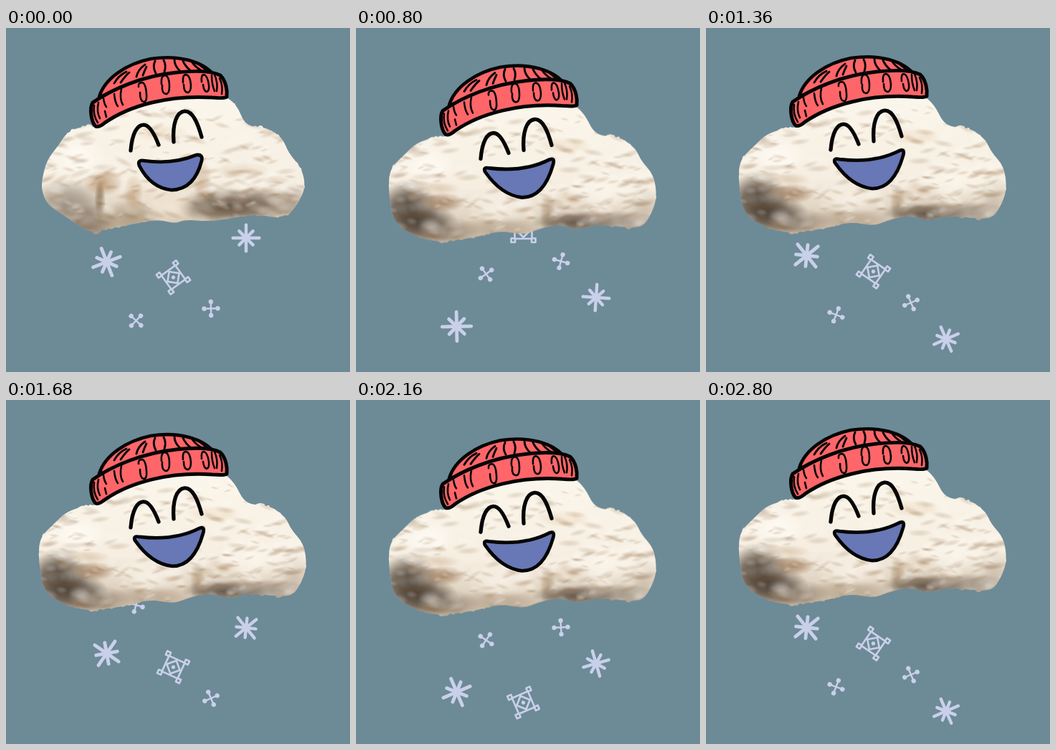
Recreate the animation shown at these times as an HTML page with a canvas. Size 480x480 px, loop 2.88 s.

```html
<!DOCTYPE html>
<html lang="en">
<head>
<meta charset="utf-8">
<title>Snow cloud</title>
<style>
html, body { margin: 0; width: 100%; height: 100%; overflow: hidden; background: #6d8a97; }
canvas { display: block; width: 480px; height: 480px; }
</style>
</head>
<body>
<canvas id="stage" width="480" height="480"></canvas>
<script>
const ctx = document.getElementById('stage').getContext('2d');
const STEP = 80, CYCLE = 18, HOLD = 3;
const SNOW = '#c9d0ea', BLACK = '#050505', RED = '#ff6669', BLUE = '#6877b5';
const mod = (a, n) => ((a % n) + n) % n;

// Cloud shapes: outline points, then soft shades as [x, y, rx, ry, rgb, alpha]
const clouds = [
  {
    seed: 7,
    outline: [50,212, 57,184, 74,163, 86,144, 112,136, 134,140, 152,116, 220,92, 300,92, 322,106, 334,137,
      362,138, 386,153, 394,174, 413,196, 418,222, 409,242, 396,260, 374,265, 350,259, 315,265, 284,270,
      250,267, 236,273, 214,267, 188,271, 160,277, 140,280, 120,286, 96,272, 76,258, 58,246, 50,228],
    shades: [
      [85,250,56,40,'134,122,108',.8], [118,272,40,26,'120,102,84',.75], [175,264,44,26,'150,126,98',.6],
      [135,216,28,18,'160,112,62',.6], [131,240,8,28,'100,70,42',.6], [305,248,66,26,'72,54,38',.85],
      [355,246,56,26,'112,94,78',.75], [274,214,14,30,'176,130,84',.5], [330,200,38,14,'196,160,122',.4],
      [402,246,24,30,'150,134,118',.5], [215,146,40,12,'220,188,146',.35], [178,230,14,26,'180,134,86',.5],
      [226,240,38,34,'240,226,206',.95], [345,212,44,20,'250,243,232',.8], [100,180,40,32,'255,251,244',.9]
    ]
  },
  {
    seed: 23,
    outline: [45,208, 48,184, 67,166, 84,149, 112,140, 136,139, 152,116, 220,92, 300,92, 319,108, 334,139,
      366,139, 390,156, 398,174, 416,194, 420,226, 411,250, 399,267, 370,266, 340,262, 310,269, 280,262,
      252,270, 234,277, 200,271, 170,280, 140,284, 112,287, 84,279, 62,267, 51,252, 48,232],
    shades: [
      [72,242,44,42,'52,40,30',.9], [98,262,46,28,'66,54,44',.85], [130,272,44,20,'130,116,102',.65],
      [120,232,32,14,'138,96,60',.65], [112,212,34,9,'190,158,120',.4], [200,268,62,16,'164,142,118',.55],
      [268,246,12,28,'150,116,80',.5], [305,260,60,18,'84,70,58',.85], [370,260,54,18,'126,112,98',.7],
      [300,226,26,12,'186,148,106',.4], [290,152,40,12,'226,196,158',.4], [402,242,24,34,'180,164,146',.45],
      [205,236,54,26,'250,243,232',.8], [345,213,50,28,'252,246,236',.8], [100,180,42,26,'255,251,244',.9]
    ]
  }
];

function smoothPath(p) {
  const path = new Path2D(), n = p.length;
  for (let i = 0; i <= n; i += 2) {
    const x = p[i % n], y = p[(i + 1) % n], nx = p[(i + 2) % n], ny = p[(i + 3) % n];
    if (i) path.quadraticCurveTo(x, y, (x + nx) / 2, (y + ny) / 2);
    else path.moveTo((x + nx) / 2, (y + ny) / 2);
  }
  path.closePath();
  return path;
}

// Small round tufts that break up the smooth edge
function addTufts(path, p, rand) {
  const n = p.length;
  for (let i = 0; i < n; i += 2) {
    for (let k = 0; k < 3; k++) {
      const u = rand(), r = 2 + rand() * 4;
      const x = p[i] + (p[(i + 2) % n] - p[i]) * u, y = p[i + 1] + (p[(i + 3) % n] - p[i + 1]) * u;
      const inset = (r + 1) / Math.hypot(x - 235, y - 195);
      path.moveTo(x, y);
      path.arc(x + (235 - x) * inset, y + (195 - y) * inset, r, 0, 2 * Math.PI);
    }
  }
}

function softBlob(c, x, y, rx, ry, rgb, alpha, turn = 0) {
  const g = c.createRadialGradient(0, 0, 0, 0, 0, 1);
  g.addColorStop(0, `rgba(${rgb},${alpha})`);
  g.addColorStop(.5, `rgba(${rgb},${alpha * .65})`);
  g.addColorStop(1, `rgba(${rgb},0)`);
  c.save();
  c.translate(x, y);
  c.rotate(turn);
  c.scale(rx, ry);
  c.fillStyle = g;
  c.fillRect(-1, -1, 2, 2);
  c.restore();
}

function renderCloud({ outline, shades, seed }) {
  const canvas = document.createElement('canvas');
  canvas.width = canvas.height = 480;
  const c = canvas.getContext('2d');
  const rand = () => (seed = seed * 16807 % 2147483647) / 2147483647;
  const path = smoothPath(outline);
  addTufts(path, outline, rand);
  c.clip(path);
  const base = c.createLinearGradient(0, 100, 0, 285);
  base.addColorStop(0, '#fbf6eb');
  base.addColorStop(.6, '#f6eee1');
  base.addColorStop(1, '#cfbfa9');
  c.fillStyle = base;
  c.fillRect(0, 0, 480, 480);
  for (const s of shades) softBlob(c, ...s);
  // Lit tufts over thin brown folds
  for (let i = 0; i < 260; i++) {
    const x = 45 + rand() * 375, y = 108 + rand() * 165, r = 5 + rand() * 13, turn = rand() - .5;
    softBlob(c, x, y + r * .6, r, r * .3, '140,100,60', .2, turn);
    softBlob(c, x, y, r, r * .6, '255,252,246', .2, turn);
  }
  return canvas;
}
const cloudImages = clouds.map(renderCloud);

const mouths = [
  'M186 192Q183 184 192 185Q232 191 266 177Q275 176 273 185Q263 225 231 226Q202 223 186 192Z',
  'M180 189Q177 182 186 184Q235 190 270 172Q278 169 275 179Q262 225 232 225Q203 222 180 189Z'
].map(d => new Path2D(d));
const eyes = new Path2D('M174 171C176 147 183 135 192 135C201 135 208 150 213 163M234 159C232 134 238 117 249 116C261 115 268 134 273 152');
const dome = new Path2D('M130 96C138 70 168 50 202 43C240 37 276 46 292 68L220 72Z');
const brim = new Path2D('M125 137C119 131 116 112 121 104C148 85 190 67 238 62C265 59 287 60 299 66C307 74 309 87 308 96C304 99 296 97 288 97C230 93 174 107 138 132Q130 139 125 137Z');
const domeRibs = new Path2D('M151 77Q157 66 168 61M160 76Q167 66 172 62M182 68Q184 58 194 51M191 66Q193 60 196 54M208 46Q204 54 209 63M220 45Q224 52 221 61M235 44Q235 53 243 60M247 46Q250 53 257 59M260 48Q264 54 272 59M271 52L281 60');
const brimRibs = new Path2D('M123 108Q121 121 128 132M129 104Q126 116 131 126M136 98Q137 106 140 110M138 116L140 124M151 92Q152 104 156 109M161 85Q158 98 163 107M185 82Q184 76 190 76Q195 77 196 92Q197 103 192 103Q187 102 187 90M217 78Q216 66 222 66Q228 67 228 82Q228 92 223 92Q217 91 218 80M247 76Q246 65 251 65Q257 66 258 80Q258 90 253 90Q248 89 248 79M273 75Q272 65 276 65Q281 66 283 79Q284 88 280 89Q276 88 275 79M287 66Q287 78 291 88M291 65Q296 77 294 88M298 70Q303 80 301 92');

function stroke(path, width) {
  ctx.lineWidth = width;
  ctx.stroke(path);
}
function fillAndStroke(path, color, width) {
  ctx.fillStyle = color;
  ctx.fill(path);
  stroke(path, width);
}

function line(x1, y1, x2, y2) {
  ctx.beginPath();
  ctx.moveTo(x1, y1);
  ctx.lineTo(x2, y2);
  ctx.stroke();
}
function dot(x, y, r) {
  ctx.beginPath();
  ctx.arc(x, y, r, 0, 2 * Math.PI);
  ctx.fill();
}
const star = size => () => {
  ctx.lineWidth = size * .22;
  for (let k = 0; k < 8; k++) {
    line(0, 0, 0, -size * (k % 2 ? .68 : .92));
    ctx.rotate(Math.PI / 4);
  }
};
function jacks() {
  ctx.lineWidth = 2.4;
  for (let k = 0; k < 4; k++) {
    line(0, 0, 0, -9);
    dot(0, -9.5, 3.2);
    ctx.rotate(Math.PI / 2);
  }
}
function lattice() {
  ctx.lineWidth = 2.6;
  for (let k = 0; k < 4; k++) {
    ctx.strokeRect(-17, -17, 5.5, 5.5);
    line(-12, -12, 12, -12);
    line(0, -10, 10, 0);
    ctx.rotate(Math.PI / 2);
  }
  dot(0, 0, 2.6);
}

// Each flake: birth step, start y, fall per step
const flakes = [
  { draw: star(22), x: 140.5, birth: 14, y: 290.5, fall: 9 },
  { draw: star(20), x: 335, birth: 0, y: 293, fall: 8.3 },
  { draw: lattice, x: 233.5, birth: 10, y: 282, fall: 8.25 },
  { draw: jacks, x: 181.5, birth: 2, y: 278, fall: 8.15 },
  { draw: jacks, x: 286, birth: 4, y: 276, fall: 8.25 }
];

// One full turn per fall, slowly speeding up
const turnAt = age => (16.4 * age + .2 * age * age) * Math.PI / 180;

function render(now) {
  const step = Math.floor(now / STEP) % CYCLE;
  const look = Math.floor(step / HOLD) % 2;
  ctx.fillStyle = '#6d8a97';
  ctx.fillRect(0, 0, 480, 480);
  ctx.lineCap = ctx.lineJoin = 'round';

  ctx.strokeStyle = ctx.fillStyle = SNOW;
  for (const f of flakes) {
    const age = mod(step - f.birth, CYCLE);
    ctx.save();
    ctx.translate(f.x, f.y + f.fall * age);
    ctx.rotate(turnAt(age));
    f.draw();
    ctx.restore();
  }

  ctx.save();
  ctx.translate(0, 6.7 - 7.8 * Math.cos(2 * Math.PI * (step - 16.4) / CYCLE));
  ctx.drawImage(cloudImages[look], 0, 0);
  ctx.strokeStyle = BLACK;
  fillAndStroke(dome, RED, 4.6);
  stroke(domeRibs, 2.9);
  fillAndStroke(brim, RED, 5);
  stroke(brimRibs, 2.6);
  stroke(eyes, 5.3);
  fillAndStroke(mouths[look], BLUE, 4.8);
  ctx.restore();
  requestAnimationFrame(tick);
}

const start = performance.now();
function tick() { render(performance.now() - start); }
tick();
</script>
</body>
</html>
```
